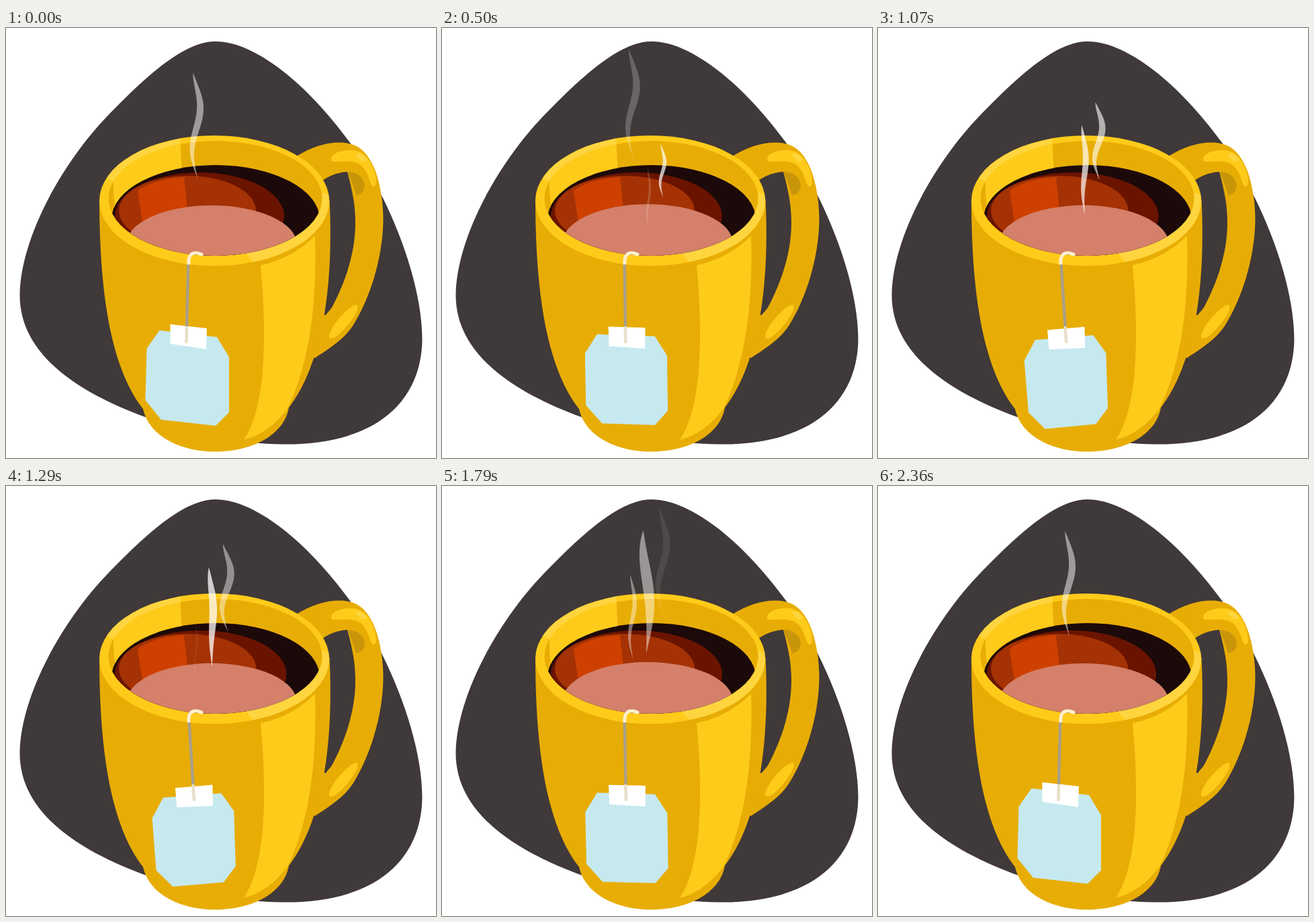
Recreate the animation shown at these times as an HTML page. Size 640 by 640 pixels, loop 2430 ms.

```html
<!DOCTYPE html>
<html lang="en">
<head>
<meta charset="utf-8">
<title>Cup of tea</title>
<style>
  html, body { margin: 0; width: 100%; height: 100%; overflow: hidden; background: #fff; }
  svg { display: block; width: 100vw; height: 100vh; }
</style>
</head>
<body>
<svg viewBox="0 0 640 640">
  <defs>
    <clipPath id="inside"><ellipse cx="311.5" cy="253.5" rx="159" ry="85.5"/></clipPath>
    <clipPath id="rim">
      <path clip-rule="evenodd" d="M139 257a171 97 0 0 1 342 0a171 97 0 0 1-342 0z M152.5 253.5a159 85.5 0 0 1 318 0a159 85.5 0 0 1-318 0z"/>
    </clipPath>
  </defs>

  <path fill="#403939" d="M312 20C373 20 454 89 515 175C566 246 619 370 619.5 462C619 560 545 622 410 619.5C330 618 265 602 210 580C91 537 20 477 20.5 397C22 310 85 200 150 132C210 70 265 20 312 20Z"/>

  <!-- handle -->
  <path fill="#e8ad05" d="M432 191C462 172 497 165 520 175C548 188 561 235 561.5 285C561 345 540 405 517 442C503 464 478 479 460 491L430 480L450 430L476 427C480 422 483 419 485 416C505 378 520 335 520 290C520 262 515 240 508 214C492 215 478 221 469 229Z"/>
  <path fill="#c9960a" d="M508 214C525 214 534 225 534 235C533 245 526 249 521 249C518 236 512 224 508 214Z"/>
  <path fill="#ffcb1a" d="M484 196C484 186 500 181 515 182C535 183 545 200 550 220C552 232 550 236 547 236C541 234 541 215 528 204C518 196 500 199 490 199Q484 199 484 196Z"/>
  <path fill="#ffd53f" d="M520 187C528 186 534 189 537 196Q534 199 531 199Q525 195 520 187Z"/>
  <path fill="#ffcb1a" d="M481 460C480 448 508 414 521 412C525 411 524 418 521 424C512 441 492 463 484 462Q481 462 481 460Z"/>

  <!-- cup -->
  <path fill="#e8ad05" d="M139 255C139 390 155 505 204 567C213 608 260 630.5 312 630.5C366 630.5 414 606 421 565C463 510 489 410 481.5 255Z"/>
  <path fill="#ffcb1a" d="M379 353C410 347 440 330 460 309C463 420 450 500 420 565C400 592 378 607 354 613C390 560 387 440 379 353Z"/>
  <ellipse cx="310" cy="257" rx="171" ry="97" fill="#ffcb1a"/>
  <g clip-path="url(#rim)" fill="#ffd53f">
    <path d="M466 244L490 251V360L368 349L357 335Z"/>
    <path d="M130 215L160 228L260 176L259 150L130 150Z"/>
  </g>

  <!-- tea -->
  <g clip-path="url(#inside)">
    <path fill="#e8ad05" d="M259 160L266 300H490V160Z"/>
    <path fill="#e8ad05" d="M160 226C150 240 148 262 158 280L163 268C160 255 160 240 160 226Z"/>
    <ellipse cx="312" cy="285" rx="155" ry="81" fill="#1c0909"/>
    <ellipse id="deep" cy="280" ry="65" fill="#6a1400"/>
    <ellipse id="warm" cy="272" ry="52" fill="#a43204"/>
    <path fill="#ce4000" d="M196 242C210 232 235 223 265 222L270 270L203 290Z"/>
    <ellipse id="milk" cx="306" rx="127" ry="58" fill="#d4806a"/>
  </g>

  <g id="steam" fill="#fff"></g>

  <!-- tea bag -->
  <polygon id="bag" fill="#c6e9ef"/>
  <polygon id="tag" fill="#fff"/>
  <g fill="none" stroke-width="4.5">
    <path id="string" stroke="#aa9f88"/>
    <path id="end" stroke="#e9dfc8" stroke-linecap="round"/>
    <path d="M272 352C271 338 276 331 291 337" stroke="#fbefcb" stroke-width="5"/>
    <circle cx="291" cy="337" r="2.5" fill="#fbefcb"/>
  </g>
</svg>
<script>
const LOOP = 2430, STEP = 1000 / 14, CYCLE = 33, SLICES = 28;
const { PI, sin, cos } = Math;
const $ = id => document.getElementById(id);
const mix = (a, b, t) => a + (b - a) * t;
const wave = u => (1 - cos(u * PI)) / 2;
const set = (el, attrs) => { for (const n in attrs) el.setAttribute(n, attrs[n]); };

const bag = [[228.5, 450], [314, 460], [332, 490], [332, 572], [312, 592], [231, 583], [207.5, 554], [209.5, 477]];
const tag = [[244.5, 441], [299, 447], [298, 478], [244.5, 470]];

// turns a flat piece on its string, with a little perspective
function sway(points, dx, dy, swing) {
  return points.map(([x, y]) => {
    const across = x - 270, down = y - 460;
    return [x + swing * (dx + .07 * down - .0006 * across * down),
            y + swing * (dy - .2 * across)];
  }).join(' ');
}

const rise = u => u;
const slowRise = u => sin(u * PI / 2);

// from and to hold the top and bottom ends; peak is when the wisp is clearest
const wisps = [
  { x: 283, start: 16, life: 30, from: [223, 296], to: [22, 170], lift: slowRise, peak: .48, alpha: .52, bend: 0 },
  { x: 328, start: 0, life: 28, from: [228, 274], to: [8, 186], lift: rise, peak: .34, alpha: .75, bend: 0 },
  { x: 307.5, start: 4, life: 29, from: [230, 310], to: [4, 226], lift: rise, peak: .48, alpha: .75, bend: 1 }
];
for (const w of wisps) {
  w.el = document.createElementNS('http://www.w3.org/2000/svg', 'polygon');
  $('steam').append(w.el);
}

const fade = (u, peak) => sin(PI * u ** (Math.log(.5) / Math.log(peak))) ** 1.5;

function drawWisp(w, k) {
  const u = ((k - w.start + CYCLE) % CYCLE) / w.life;
  if (u <= 0 || u >= 1) return set(w.el, { opacity: 0 });

  const top = mix(w.from[0], w.to[0], w.lift(u));
  const bottom = mix(w.from[1], w.to[1], u);
  const size = Math.min(1, .2 + 1.3 * u);
  const bend = w.bend * wave(u);
  const left = [], right = [];
  for (let i = 0; i <= SLICES; i++) {
    const v = i / SLICES, y = mix(top, bottom, v);
    const curl = 6.5 * sin(2 * PI * (1.2 * v - .14));
    const bow = -3.5 - 7 * cos(2 * PI * (.9 * v - .12));
    const half = mix(5.5, 8.5, bend) * sin(PI * v ** .8);
    const mid = mix(curl, bow, bend);
    left.push([w.x + size * (mid - half), y]);
    right.unshift([w.x + size * (mid + half), y]);
  }
  set(w.el, { opacity: w.alpha * fade(u, w.peak), points: [...left, ...right].join(' ') });
}

function draw(time) {
  const t = Math.floor((time % LOOP) / 10) * 10;
  const k = Math.floor((t + 4.99) / STEP) % CYCLE;

  const swing = wave(k < 16 ? k / 16 : (CYCLE - k) / 17);
  set($('bag'), { points: sway(bag, 6.5, 6, swing) });
  set($('tag'), { points: sway(tag, 9.3, 3.5, swing) });
  const knot = 269 + 9.7 * swing;
  set($('string'), { d: `M${271.2 + 1.3 * swing} 351L${knot} 444` });
  set($('end'), { d: `M${knot} 446L${268.5 + 11.9 * swing} 467` });

  const p = k / CYCLE;
  const ripple = wave(p * 4), swell = 1.75 * Math.sqrt(sin(PI * p));
  set($('deep'), { cx: 288 + swell, rx: 126 + swell });
  set($('warm'), { cx: 270 + 2.1 * ripple, rx: 102 + 2.1 * ripple });
  set($('milk'), { cy: 322 - 1.9 * ripple });

  for (const w of wisps) drawWisp(w, k);
}

const start = performance.now();
function tick() {
  draw(performance.now() - start);
  requestAnimationFrame(tick);
}
tick();
</script>
</body>
</html>
```
